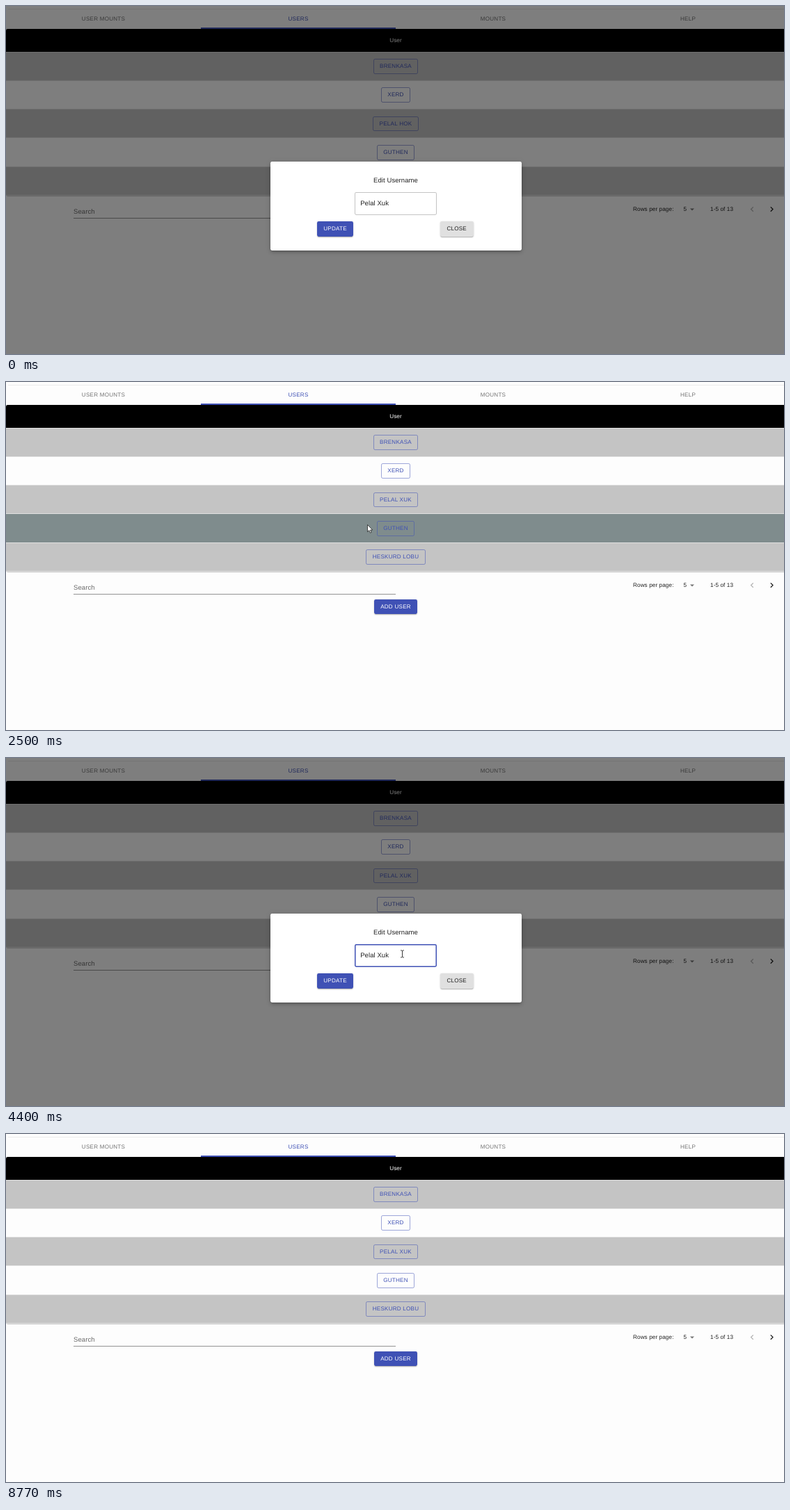
An HTML page that plays this animation: 1118x501 px, repeating every 9320 ms.

```html
<!DOCTYPE html>
<html lang="en">
<head>
<meta charset="utf-8">
<title>Users</title>
<style>
html, body { margin: 0; width: 100%; height: 100%; overflow: hidden; background: #fdfdfd; }
#stage {
  position: absolute; left: 0; top: 0; width: 1118px; height: 501px; overflow: hidden;
  background: #fdfdfd; color: rgba(0,0,0,.87);
  font: 8.2px/12px "Liberation Sans", Arial, sans-serif;
  letter-spacing: .01em; text-rendering: geometricPrecision; white-space: pre;
}
#stage div, #stage svg { position: absolute; box-sizing: border-box; }
.edge { left: 3px; top: 4px; width: 1115px; height: 1px; background: #ececec; }
.tab { top: 13px; width: 280px; text-align: center; color: rgba(0,0,0,.54); }
.tab, .btn, .solid { font-size: 8.1px; letter-spacing: .0286em; }
.tab.on { color: #3f51b5; }
.ink { left: 280px; top: 31px; width: 280px; height: 2px; background: #3f51b5; }
.table {
  left: 0; top: 33px; width: 1120px; height: 240px; border-radius: 2.4px; overflow: hidden;
}
.lift { overflow: visible; box-shadow: 0 1.2px .6px -.6px rgba(0,0,0,.2), 0 .6px .6px rgba(0,0,0,.14), 0 .6px 1.8px rgba(0,0,0,.12); }
.head, .row { left: 0; width: 1120px; border-bottom: 1px solid #e0e0e0; }
.head { top: 0; height: 33.5px; background: #000; color: #fff; text-align: center; line-height: 33px; }
.row { height: 41.3px; background: #fdfdfd; display: flex; justify-content: center; }
.row.odd { background: #c4c4c4; }
.row.hover { background: #7f8c8d; }
#stage .btn {
  position: relative; top: 9.6px; height: 21.6px; padding: 0 8.2px;
  border: 1px solid rgba(63,81,181,.5); border-radius: 2.4px; line-height: 20px; color: #3f51b5;
}
#stage .btn.hover { border-color: #3f51b5; background: rgba(63,81,181,.04); }
.solid {
  height: 21.6px; line-height: 21.6px; text-align: center; border-radius: 2.4px;
  color: #fff; background: #3f51b5;
  box-shadow: 0 1.8px .6px -1.2px rgba(0,0,0,.2), 0 1.2px 1.2px rgba(0,0,0,.14), 0 .6px 3px rgba(0,0,0,.12);
}
.solid.hover { background: #303f9f; }
.solid.grey { background: #e0e0e0; color: rgba(0,0,0,.87); }
.solid.grey.hover { background: #d5d5d5; }
.big { font-size: 9.5px; }
#ripple { border-radius: 50%; background: rgba(63,81,181,.3); }
#modal { left: 0; top: 0; width: 1118px; height: 501px; background: rgba(0,0,0,.5); }
.paper {
  left: 379.5px; top: 223.5px; width: 361.5px; height: 128.5px; border-radius: 2.4px; background: #fff;
  box-shadow: 0 1.8px 3px -1px rgba(0,0,0,.2), 0 3px 5px rgba(0,0,0,.14), 0 1px 8px rgba(0,0,0,.12);
}
#field {
  left: 501px; top: 267.5px; width: 118px; height: 33px; border-radius: 2.4px;
  box-shadow: inset 0 0 0 1px rgba(0,0,0,.23);
}
#field.hover { box-shadow: inset 0 0 0 1px rgba(0,0,0,.87); }
#field.focus { box-shadow: inset 0 0 0 1.5px #3f51b5; }
#caret { width: 1px; height: 10px; top: 279px; background: #000; }
</style>
</head>
<body>
<div id="stage">
  <div class="edge"></div>
  <div class="ink"></div>
  <div class="table lift"></div>
  <div class="table" id="table"><div class="head">User</div></div>
  <div class="big" style="left:97px;top:290.5px;color:rgba(0,0,0,.58)">Search</div>
  <div style="left:97px;top:305px;width:463px;height:1px;background:rgba(0,0,0,.42)"></div>
  <div style="left:901px;top:287px">Rows per page:</div>
  <div style="left:973.5px;top:287px">5</div>
  <div style="left:1012px;top:287px">1-5 of 13</div>
  <svg width="140" height="20" style="left:978px;top:283px" fill="none" stroke-width="1.3">
    <path d="M5 8.5h6l-3 3z" fill="#000" fill-opacity=".54"/>
    <path d="M95.8 6.4l-3.2 3.2 3.2 3.2" stroke="#000" stroke-opacity=".3"/>
    <path d="M120.8 6.4l3.2 3.2-3.2 3.2" stroke="#000" stroke-opacity=".9"/>
  </svg>
  <div class="solid" style="left:529px;top:312.6px;width:62px">ADD USER</div>
  <div id="ripple"></div>
  <div id="modal">
    <div class="paper"></div>
    <div class="big" style="left:380px;top:245.5px;width:360px;text-align:center">Edit Username</div>
    <div id="field"></div>
    <div id="value" class="big" style="left:509.2px;top:278.6px"></div>
    <div id="caret"></div>
    <div id="update" class="solid" style="left:447px;top:310.2px;width:52px">UPDATE</div>
    <div id="close" class="solid grey" style="left:623.5px;top:310.2px;width:48.4px">CLOSE</div>
  </div>
  <svg id="cursor" width="16" height="18" style="left:0;top:0;overflow:visible">
    <path id="arrow" d="M0 0v10.2l2.3-2.1 1.6 3.6 1.7-.8-1.6-3.4h3.2z" fill="#fff" stroke="#222" stroke-width=".8"/>
    <path id="hand" d="M-.6.6c0-1 1.6-1 1.6 0v4.2l4 .7c1 .2 1.4.7 1.3 1.6l-.5 3.4-.9 2.6H.2L-2.8 8.6c-.6-1 .4-1.6 1.1-1l1.1 1z" fill="#fff" stroke="#222" stroke-width=".8"/>
    <path id="beam" d="M-2.4-5h1.8l.6.5.6-.5h1.8M0-4.5v9M-2.4 5h1.8l.6-.5.6.5h1.8" fill="none" stroke="#222" stroke-width=".9"/>
  </svg>
</div>
<script>
const LOOP = 9320;
const $ = id => document.getElementById(id);
const OLD = 'Pelal Hok', NEW = 'Pelal Xuk';

// Each track lists [start in ms, value]; a value holds until the next start.
const tracks = {
  name: [[0, OLD], [1830, NEW]],
  value: [[0, NEW], [6250, NEW + 'ev']],
  modal: [[0, 1], [1830, 0], [2970, .6], [3120, 1], [7930, 0]],
  row: [[0, -1], [2370, 4], [2500, 3], [2660, 2], [2970, -1]],
  press: [[0, false], [2810, true], [3280, false]],
  ripple: [[0, 0], [2970, 6], [3120, 11], [3280, 0]],
  field: [[0, ''], [3690, 'hover'], [3835, 'focus'], [7930, '']],
  caret: [[0, 0], [3835, 1], [4400, 0], [4960, 1], [5520, 0], [5980, 1], [6530, 0], [7090, 1], [7650, 0]],
  update: [[0, false], [1690, true], [1830, false]],
  close: [[0, false], [7650, true], [7930, false]],
  cursor: [
    [0, ['none', 0, 0]],
    ...glide(560, 1530, 8, [425, 487], [464, 327.5]),
    [1690, ['hand', 464, 327.5]], [1830, ['arrow', 464, 327.5]],
    [2240, ['arrow', 470, 316]], [2370, ['arrow', 492, 262]], [2500, ['arrow', 519.5, 205.5]],
    [2660, ['arrow', 546, 181]], [2810, ['hand', 560.5, 168]], [3120, ['arrow', 560.5, 168]],
    [3400, ['arrow', 563, 200]], [3545, ['arrow', 567, 250]], [3690, ['beam', 569.5, 282]],
    [7090, ['beam', 588, 288]], [7230, ['arrow', 612, 297]], [7370, ['arrow', 628, 305]],
    [7650, ['hand', 633.5, 313.5]], [7930, ['arrow', 633.5, 313.5]], [8770, ['none', 0, 0]]
  ]
};

function glide(t0, t1, n, a, b) {
  return Array.from({ length: n }, (_, i) => {
    const k = i / (n - 1), e = 1 - (1 - k) ** 1.6;
    return [t0 + (t1 - t0) * k, ['arrow', a[0] + (b[0] - a[0]) * e, a[1] + (b[1] - a[1]) * e]];
  });
}

function at(track, t) {
  let v = track[0][1];
  for (const [start, next] of track) if (t >= start) v = next;
  return v;
}

function add(parent, cls, text = '') {
  const el = document.createElement('div');
  el.className = cls;
  el.textContent = text;
  parent.append(el);
  return el;
}

['USER MOUNTS', 'USERS', 'MOUNTS', 'HELP'].forEach((label, i) => {
  add($('stage'), i === 1 ? 'tab on' : 'tab', label).style.left = i * 280 + 'px';
});
// The modal and cursor stay on top of the tabs.
$('stage').append($('modal'), $('cursor'));

const rows = ['BRENKASA', 'XERD', '', 'GUTHEN', 'HESKURD LOBU'].map((label, i) => {
  const row = add($('table'), i % 2 ? 'row' : 'row odd');
  row.style.top = 33.5 + i * 41.3 + 'px';
  return { row, btn: add(row, 'btn', label) };
});

function setText(el, s) {
  if (el.textContent !== s) el.textContent = s;
}

function draw(t) {
  const s = {};
  for (const key in tracks) s[key] = at(tracks[key], t);

  setText(rows[2].btn, s.name.toUpperCase());
  setText($('value'), s.value);
  rows.forEach(({ row }, i) => row.classList.toggle('hover', i === s.row));
  rows[2].btn.classList.toggle('hover', s.press);

  const r = s.ripple;
  $('ripple').style.cssText = `left:${560 - r}px;top:${168.5 - r}px;width:${2 * r}px;height:${2 * r}px`;

  $('modal').style.opacity = s.modal;
  $('field').className = s.field;
  $('caret').style.opacity = s.caret;
  $('caret').style.left = (s.value === NEW ? 550 : 560) + 'px';
  $('update').classList.toggle('hover', s.update);
  $('close').classList.toggle('hover', s.close);

  const [kind, x, y] = s.cursor;
  for (const id of ['arrow', 'hand', 'beam']) $(id).style.display = id === kind ? '' : 'none';
  $('cursor').style.transform = `translate(${x}px,${y}px)`;
}

const begin = performance.now();
function tick() {
  draw((performance.now() - begin) % LOOP);
  requestAnimationFrame(tick);
}
tick();
</script>
</body>
</html>
```
